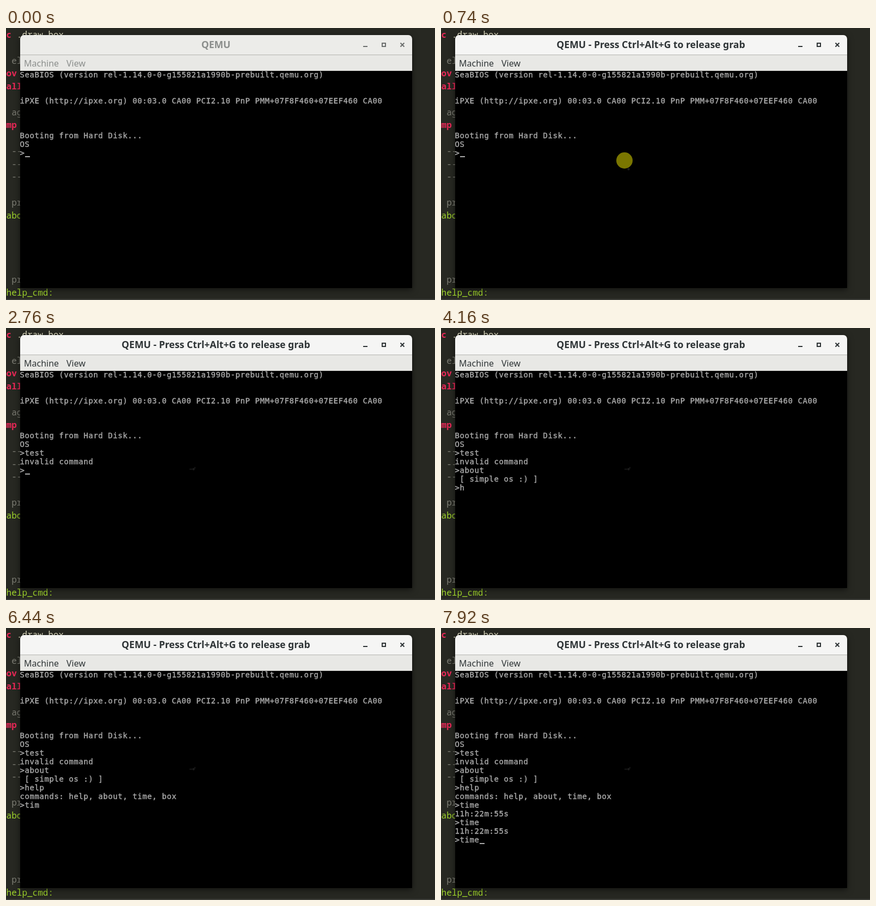
Write an HTML page with a canvas that moves like this. It is 788 by 501 pixels and loops after 7990 ms.

```html
<!DOCTYPE html>
<html lang="en">
<head>
<meta charset="utf-8">
<title>Boot console</title>
<style>
  html, body { margin: 0; width: 100%; height: 100%; overflow: hidden; background: #272822; }
  canvas { display: block; }
</style>
</head>
<body>
<canvas id="stage" width="788" height="501"></canvas>
<script>
const ctx = document.getElementById('stage').getContext('2d');
const LOOP = 7990;
const SANS = '"Noto Sans", "Open Sans", sans-serif';
const MONO = '"Noto Sans Mono", "DejaVu Sans Mono", monospace';
const CONSOLE = '14px "DejaVu Sans Mono", monospace';
const RED = '#e82857', GREEN = '#a0d52c', GREY = '#7d7d74', CREAM = '#e6e4c8';

// Editor behind the window: [line, column, text, colour]
const CODE = [
  [0, 0, 'c', RED], [0, 2, '.draw_box', CREAM], [2, 1, 'el', GREY],
  [3, -1, 'mov', RED], [4, -1, 'call', RED], [6, 1, 'ag', GREY],
  [7, 0, 'mp', RED], [9, 1, '--', GREY], [10, 1, '--', GREY],
  [11, 1, '--', GREY], [13, 1, 'pr', GREY], [14, 0, 'abo', GREEN],
  [19, 1, 'pr', GREY], [20, 0, 'help_cmd:', GREEN]
];

const BOOT = `SeaBIOS (version rel-1.14.0-0-g155821a1990b-prebuilt.qemu.org)


iPXE (http://ipxe.org) 00:03.0 CA00 PCI2.10 PnP PMM+07F8F460+07EEF460 CA00



Booting from Hard Disk...
OS
>`;
const CLOCK = '\n11h:22m:55s\n>';

// Console output: [time, appended text]
const OUTPUT = [
  [1890, 't'], [1960, 'es'], [2160, 't'], [2360, '\ninvalid command\n>'],
  [2890, 'a'], [2960, 'b'], [3030, 'o'], [3160, 'u'], [3360, 't'],
  [3620, '\n [ simple os :) ]\n>'],
  [4160, 'h'], [4290, 'e'], [4420, 'l'], [4680, 'p'],
  [4950, '\ncommands: help, about, time, box\n>'],
  [6240, 't'], [6310, 'i'], [6440, 'm'], [6570, 'e'], [6710, CLOCK],
  [6980, 't'], [7040, 'i'], [7180, 'm'], [7250, 'e'], [7450, CLOCK],
  [7590, 't'], [7720, 'i'], [7790, 'm'], [7920, 'e']
];
const BLINKS = [330, 600, 880, 1150, 1410, 1690, 1960, 2220, 2490, 2760, 3030,
  3290, 3620, 3890, 4160, 4420, 4680, 4950, 5220, 5500, 5770, 6040, 6310,
  6570, 6910, 7180, 7450, 7720];

const clamp = v => Math.max(0, Math.min(1, v));
const mix = (a, b, k) => `rgb(${a.map((v, i) => Math.round(v + (b[i] - v) * k))})`;

function rect(x, y, w, h, color) {
  ctx.fillStyle = color;
  ctx.fillRect(x, y, w, h);
}

function text(str, x, y, font, color, align = 'left') {
  ctx.font = font;
  ctx.fillStyle = color;
  ctx.textAlign = align;
  ctx.fillText(str, x, y);
}

function disc(x, y, r, color) {
  ctx.fillStyle = color;
  ctx.beginPath();
  ctx.arc(x, y, r, 0, 7);
  ctx.fill();
}

function drawEditor() {
  rect(0, 0, 788, 501, '#272822');
  rect(0, 499, 788, 2, '#3b3c37');
  for (const [line, column, str, color] of CODE) {
    const weight = color === RED ? 700 : 500;
    text(str, 0.6 + column * 9.6, 18 + line * 23.75, `${weight} 16px ${MONO}`, color);
  }
}

function drawWindow(t) {
  const active = t < 600 ? 0 : clamp((t - 530) / 140);
  const tint = t < 600 ? 0.3 * clamp(1 - t / 130) : active;
  const ink = mix([139, 142, 140], [46, 52, 54], active);
  const icon = mix([108, 111, 110], [46, 52, 54], active);

  ctx.save();
  ctx.shadowColor = 'rgba(0,0,0,.55)';
  ctx.shadowBlur = 12;
  ctx.shadowOffsetY = 3;
  ctx.fillStyle = mix([232, 232, 229], [245, 245, 244], tint);
  ctx.beginPath();
  ctx.roundRect(26, 13, 720, 466, [7, 7, 0, 0]);
  ctx.fill();
  ctx.restore();

  rect(26, 49, 720, 1, '#b4b4b0');
  rect(26, 50, 720, 28, '#e8e8e5');
  rect(26, 78, 720, 1, '#d8d8d5');
  rect(26, 79, 720, 400, '#000');

  const title = active ? 'QEMU - Press Ctrl+Alt+G to release grab' : 'QEMU';
  text(title, 385.5, 37, 'bold 17.6px ' + SANS, ink, 'center');
  text('Machine', 33, 71, '16px ' + SANS, ink);
  text('View', 111, 71, '16px ' + SANS, ink);

  rect(656, 33, 8, 2, icon);
  ctx.strokeStyle = icon;
  ctx.lineWidth = 2;
  ctx.strokeRect(691, 28, 6, 6);
  ctx.beginPath();
  ctx.moveTo(724.5, 27.5); ctx.lineTo(731.5, 34.5);
  ctx.moveTo(731.5, 27.5); ctx.lineTo(724.5, 34.5);
  ctx.stroke();
}

function drawConsole(t) {
  const shown = OUTPUT.filter(([at]) => at <= t).map(([, str]) => str).join('');
  const lines = (BOOT + shown).split('\n');
  ctx.save();
  ctx.strokeStyle = '#aaa';
  ctx.lineWidth = 0.4;
  // One 9 by 16 cell per character
  lines.forEach((line, row) => [...line].forEach((char, column) => {
    const x = 25.5 + column * 9, y = 91 + row * 16;
    text(char, x, y, CONSOLE, '#aaa');
    ctx.strokeText(char, x, y);
  }));
  ctx.restore();
  if (BLINKS.filter(at => at <= t).length % 2 === 0) {
    const row = lines.length - 1;
    rect(26 + lines[row].length * 9, 92 + row * 16, 9, 2, '#aaa');
  }
}

function drawPointer(t) {
  if (t >= 600 && t < 810) disc(337, 244, 15, '#7a7600');
  if (t >= 670) disc(344.5, 260, 2.2, '#1b1b1b');
  if (t >= 810) {
    rect(337, 259, 5, 2, '#151515');
    rect(346, 256, 2, 3, '#151515');
  }
  if (t < 330 || t >= 670) return;

  const k = clamp((t - 330) / 270);
  const ease = k * k * (3 - 2 * k);
  ctx.save();
  ctx.translate(655 - 318 * ease, 443 - 199 * ease);
  ctx.fillStyle = '#fff';
  ctx.strokeStyle = '#000';
  ctx.lineWidth = 1;
  ctx.beginPath();
  for (const [x, y] of [[0, 0], [0, 15], [3.5, 12], [6, 17.5], [8.5, 16.5], [6, 11], [10.5, 11]])
    ctx.lineTo(x, y);
  ctx.closePath();
  ctx.fill();
  ctx.stroke();
  ctx.restore();
}

const start = performance.now();
function frame() {
  const t = (performance.now() - start) % LOOP;
  drawEditor();
  drawWindow(t);
  drawConsole(t);
  drawPointer(t);
  requestAnimationFrame(frame);
}
frame();
</script>
</body>
</html>
```
